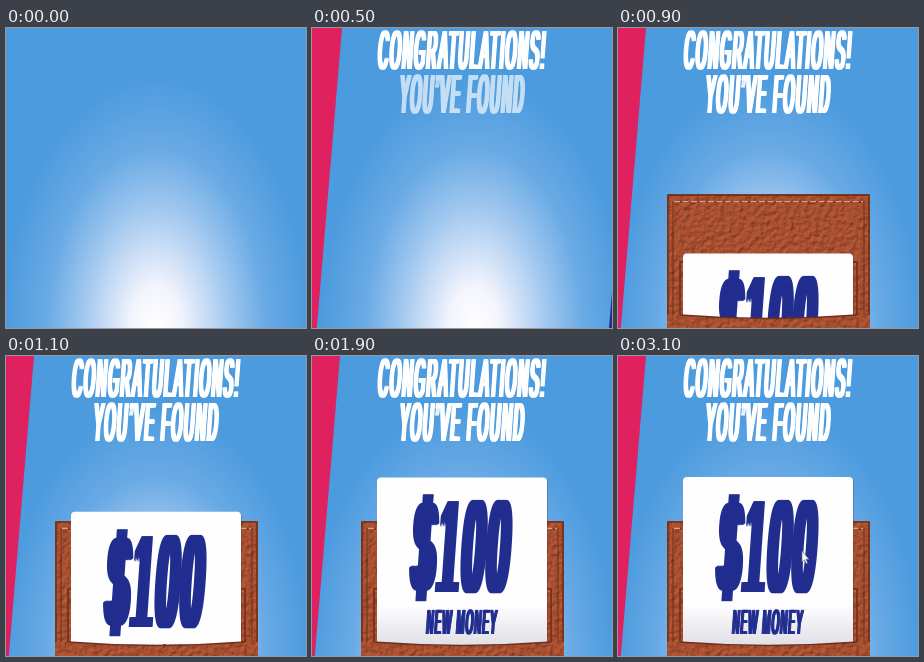
An HTML page for the animation above (3200 ms loop, 300x300 px).

```html
<!DOCTYPE html>
<html lang="en">
<head>
<meta charset="utf-8">
<title>You’ve found $100</title>
<style>
  html, body { margin: 0; width: 100%; height: 100%; overflow: hidden; }
  svg { display: block; width: 100vw; height: 100vh; }
  text { font-family: "Liberation Sans", Arial, sans-serif; letter-spacing: .14em; text-anchor: middle; }
</style>
</head>
<body>
<svg viewBox="0 0 300 300">
  <defs>
    <radialGradient id="glow" gradientUnits="userSpaceOnUse" cx="0" cy="0" r="1"
                    gradientTransform="translate(150 300) scale(152 250)">
      <stop offset="0" stop-color="#fff"/>
      <stop offset=".16" stop-color="#f4f5fd"/>
      <stop offset=".32" stop-color="#cbdef6"/>
      <stop offset=".5" stop-color="#9cc5ee"/>
      <stop offset=".72" stop-color="#69aae5"/>
      <stop offset="1" stop-color="#4c9bde"/>
    </radialGradient>
    <linearGradient id="paper" x2="0" y2="1">
      <stop offset=".75" stop-color="#fefeff"/>
      <stop offset="1" stop-color="#dedee5"/>
    </linearGradient>
    <filter id="leather" x="0" y="0" width="1" height="1" color-interpolation-filters="sRGB">
      <feTurbulence type="fractalNoise" baseFrequency=".2" numOctaves="3" seed="4"/>
      <feDiffuseLighting surfaceScale="1.2" lighting-color="#c25c38">
        <feDistantLight azimuth="235" elevation="60"/>
      </feDiffuseLighting>
      <feComposite in2="SourceGraphic" operator="in"/>
    </filter>
  </defs>

  <rect id="sky" x="-60" width="420" height="300" fill="url(#glow)"/>
  <path id="pink" d="M-40 0H28L2.8 300H-40Z" fill="#e0215f"/>
  <path id="navy" d="M325 0H340V300H300Z" fill="#232c8c"/>
  <g id="headline"></g>
  <g id="subline"></g>

  <g class="wallet">
    <rect x="49" width="203" height="140" rx="2" filter="url(#leather)"/>
    <g fill="none">
      <path d="M50 140V1H251V140" stroke="#70301a" stroke-width="1.6"/>
      <path d="M55 140V8H246V140" stroke="#70301a" stroke-opacity=".5" stroke-width="2"/>
      <path d="M56 7.5H245" stroke="#dda083" stroke-width="1.3" stroke-dasharray="6 2.5"/>
      <path d="M62 140V68H239V140" stroke="#6f2f19" stroke-width="1.6"/>
      <path d="M63 70H238" stroke="#c9764f"/>
    </g>
  </g>
  <g id="card">
    <rect x="65" width="170" height="190" rx="4" fill="#40251c" opacity=".3" transform="translate(.8 .8)"/>
    <rect x="65" width="170" height="170" rx="4" fill="url(#paper)"/>
  </g>
  <g class="wallet">
    <path d="M49 121H62Q150 128 239 121H252V145H49Z" filter="url(#leather)"/>
    <path d="M62 121Q150 128 239 121" fill="none" stroke="#6f2f19" stroke-width="1.5"/>
  </g>
  <path id="cursor" d="M0 0V11L2.4 8.8L4 12.6L5.6 11.9L4 8.2H7Z" fill="#fff" stroke="#667" stroke-width=".7"/>
</svg>
<script>
const LOOP = 3200, STEP = 100;
const byId = id => document.getElementById(id);
const wallets = document.querySelectorAll('.wallet');

// Heavy condensed italic: narrow letters thickened sideways.
function label(parent, text, x, baseline, size, color, squeeze) {
  const copies = [-.12, -.08, -.04, 0, .04, .08, .12]
    .map(shift => `<text x="${shift * size}">${text}</text>`).join('');
  byId(parent).insertAdjacentHTML('beforeend',
    `<g transform="translate(${x} ${baseline}) skewX(-4) scale(${squeeze} 1)" font-size="${size}" fill="${color}">${copies}</g>`);
}
label('headline', 'CONGRATULATIONS!', 149.5, 41, 55, '#fff', .247);
label('subline', 'YOU’VE FOUND', 149.5, 84.5, 55, '#fff', .247);
label('card', '$100', 149, 115, 132, '#212e8f', .27);
label('card', 'NEW MONEY', 149.5, 157, 35, '#212e8f', .27);

const progress = (t, start, length) => Math.min(1, Math.max(0, (t - start) / length));
const easeOut = p => 1 - (1 - p) ** 3;
const approach = (t, start, pace) => 1 - Math.exp(-Math.max(0, t - start) / pace);
const mix = (a, b, p) => a + (b - a) * p;
const move = (el, x, y) => el.setAttribute('transform', `translate(${x} ${y})`);

function draw(t) {
  // Side panels slide in slightly too far, then settle.
  const enter = easeOut(progress(t, 100, 400));
  const settle = progress(t, 500, 200);
  const overshoot = mix(2, 0, settle);
  move(byId('pink'), mix(-34, overshoot, enter), 0);
  move(byId('navy'), mix(14, -1.5 * overshoot, enter), 0);
  move(byId('sky'), mix(0, 12, enter) * (1 - settle), 0);

  byId('headline').setAttribute('opacity', progress(t, 100, 300));
  byId('subline').setAttribute('opacity', progress(t, 300, 300));

  const walletY = mix(301, 165, easeOut(progress(t, 500, 500)));
  wallets.forEach(el => move(el, 0, walletY));
  move(byId('card'), 0, mix(302, 121, approach(t, 800, 182)));

  const glide = easeOut(progress(t, 1950, 750));
  move(byId('cursor'), mix(305, 184, glide), mix(305, 195, glide));
}

function tick() {
  const t = performance.now() % LOOP;
  draw(Math.floor(t / STEP) * STEP * (t >= 2 * STEP));
  requestAnimationFrame(tick);
}
tick();
</script>
</body>
</html>
```
